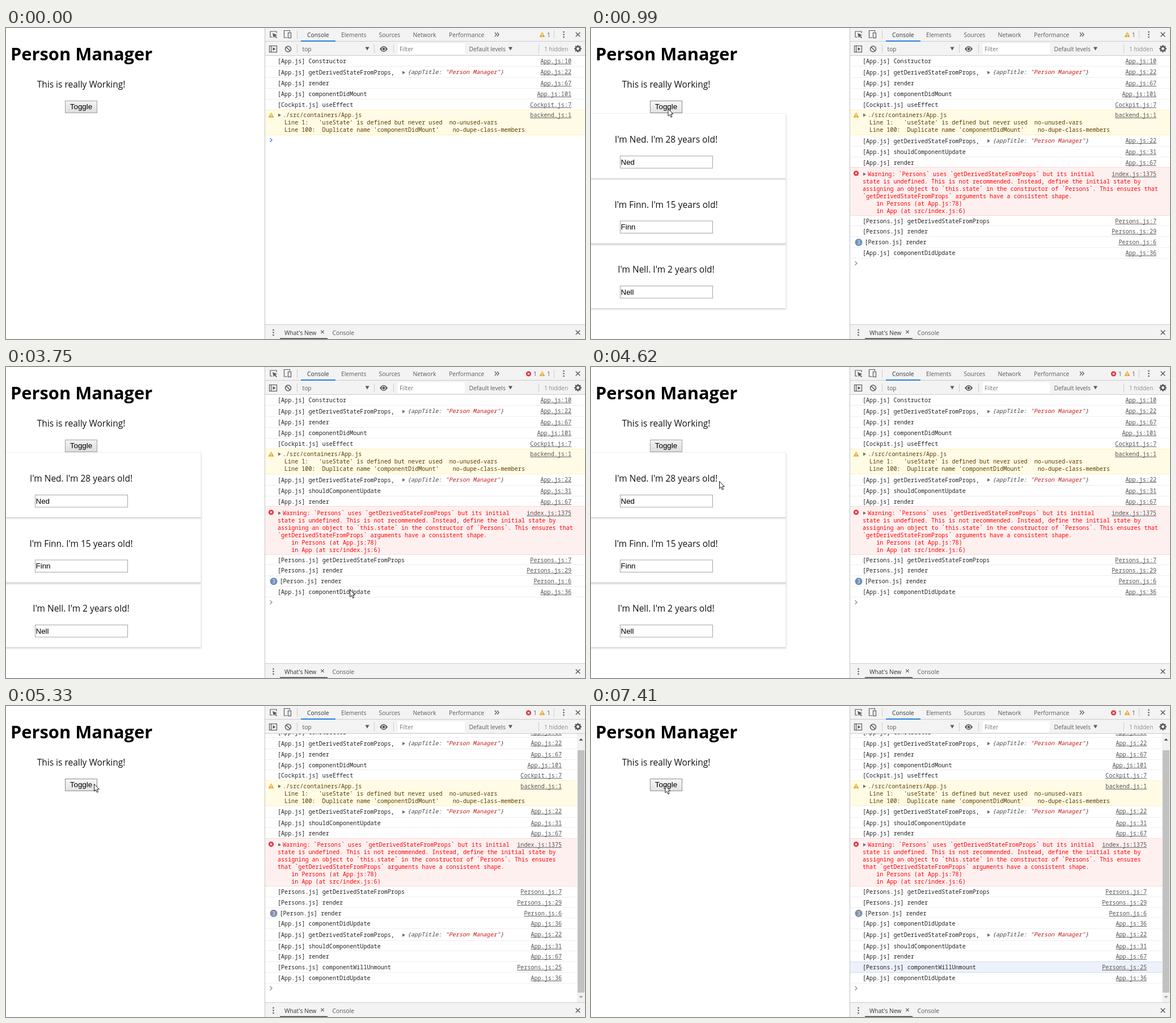
Animation of 1021 by 548 pixels, one loop 8000 ms. Source, as an HTML page with a canvas:

```html
<!DOCTYPE html>
<html lang="en">
<head>
<meta charset="utf-8">
<title>Person Manager</title>
<style>
html, body { margin: 0; width: 1021px; height: 548px; overflow: hidden; background: #fff; }
canvas { display: block; }
</style>
</head>
<body>
<canvas id="stage" width="1021" height="548"></canvas>
<script>
const ctx = document.getElementById('stage').getContext('2d');
const LOOP = 8000;
const MONO = '10.1px "Noto Sans Mono", monospace';
const UI = '10.3px "Open Sans", sans-serif';
const BODY = '15.5px "Open Sans", sans-serif';
const FORM = '13.4px "Liberation Sans", Arial, sans-serif';
const CHAR = 6.06, ROW = 18.75, LINE = 12.9, TOP = 49.3;
const CARD_TOP = 150.5, CARD = 114.5;
const PROPS = '[App.js] getDerivedStateFromProps,';

const people = [['Ned', 28], ['Finn', 15], ['Nell', 2]];
const logs = [
  ['[App.js] Constructor', 'App.js:10'],
  [PROPS, 'App.js:22', 'object'],
  ['[App.js] render', 'App.js:67'],
  ['[App.js] componentDidMount', 'App.js:101'],
  ['[Cockpit.js] useEffect', 'Cockpit.js:7'],
  ['', 'backend.js:1', 'warn'],
  [PROPS, 'App.js:22', 'object'],
  ['[App.js] shouldComponentUpdate', 'App.js:31'],
  ['[App.js] render', 'App.js:67'],
  ['', 'index.js:1375', 'error'],
  ['[Persons.js] getDerivedStateFromProps', 'Persons.js:7'],
  ['[Persons.js] render', 'Persons.js:29'],
  ['[Person.js] render', 'Person.js:6', 'count'],
  ['[App.js] componentDidUpdate', 'App.js:36'],
  [PROPS, 'App.js:22', 'object'],
  ['[App.js] shouldComponentUpdate', 'App.js:31'],
  ['[App.js] render', 'App.js:67'],
  ['[Persons.js] componentWillUnmount', 'Persons.js:25', 'hover'],
  ['[App.js] componentDidUpdate', 'App.js:36']
];
const heights = { object: 20.3, warn: 44, error: 84.2 };
const baselines = { warn: 12.5, error: 14.4 };
const tints = {
  warn: ['#fffbe5', '#fff3c0'],
  error: ['#fff0f0', '#ffd6d6'],
  hover: ['#ecf1fa', '#d3dff3']
};
const warnLines = [
  './src/containers/App.js',
  "Line 1:   'useState' is defined but never used  no-unused-vars",
  "Line 100:  Duplicate name 'componentDidMount'    no-dupe-class-members"
];
const errorLines = narrow => [
  'Warning: `Persons` uses `getDerivedStateFromProps` but its initial',
  'state is undefined. This is not recommended. Instead, define the initial state by',
  'assigning an object to `this.state` in the constructor of `Persons`. This ensures' + (narrow ? '' : ' that'),
  (narrow ? 'that ' : '') + '`getDerivedStateFromProps` arguments have a consistent shape.',
  '    in Persons (at App.js:78)',
  '    in App (at src/index.js:6)'
];

// Pointer moves: first step, last step, number of steps, end x, end y
const moves = [
  [70, 830, 11, 135.5, 142], [1250, 1500, 4, 135.5, 126],
  [1810, 1810, 1, 135.5, 114], [1880, 1880, 1, 135.5, 126],
  [2350, 2430, 2, 136, 134], [2810, 3450, 9, 606, 399],
  [3750, 3750, 1, 606, 392], [3820, 4540, 10, 233, 204],
  [4620, 4620, 1, 226, 201], [4700, 4860, 3, 156, 134],
  [5090, 5090, 1, 156, 125], [5240, 5240, 1, 155, 137],
  [5500, 5870, 6, 635, 439], [6100, 6320, 4, 634, 460],
  [6490, 6490, 1, 634, 457], [6640, 6640, 1, 620, 457],
  [6790, 7410, 9, 130.5, 140]
];

function pointerAt(t) {
  let x = 905, y = 549;
  for (const [start, end, steps, toX, toY] of moves) {
    if (t < start) break;
    const step = t >= end ? steps : 1 + Math.floor((t - start) / (end - start) * (steps - 1));
    const p = step / steps, ease = p * p * (3 - 2 * p);
    x += (toX - x) * ease;
    y += (toY - y) * ease;
  }
  return [x, y];
}

function rect(x, y, w, h, color) {
  ctx.fillStyle = color;
  ctx.fillRect(x, y, w, h);
}
function text(str, x, y, font, color = '#222', align = 'left') {
  ctx.font = font;
  ctx.fillStyle = color;
  ctx.textAlign = align;
  ctx.fillText(str, x, Math.round(y));
}
function poly(points, fill, stroke, width = 1, close = !!fill) {
  ctx.beginPath();
  points.forEach(([x, y]) => ctx.lineTo(x, y));
  if (close) ctx.closePath();
  if (fill) { ctx.fillStyle = fill; ctx.fill(); }
  if (stroke) { ctx.strokeStyle = stroke; ctx.lineWidth = width; ctx.stroke(); }
}
function circle(x, y, r, fill, stroke, width = 1) {
  ctx.beginPath();
  ctx.arc(x, y, r, 0, Math.PI * 2);
  if (fill) { ctx.fillStyle = fill; ctx.fill(); }
  if (stroke) { ctx.strokeStyle = stroke; ctx.lineWidth = width; ctx.stroke(); }
}
function frame(x, y, w, h, color, width = 1) {
  ctx.strokeStyle = color;
  ctx.lineWidth = width;
  ctx.strokeRect(x, y, w, h);
}
function cross(x, y, r, color, width) {
  poly([[x - r, y - r], [x + r, y + r]], null, color, width);
  poly([[x + r, y - r], [x - r, y + r]], null, color, width);
}
function dots(x, y) {
  for (const dy of [-4.5, 0, 4.5]) circle(x, y + dy, 1.3, '#5a5a5a');
}
const down = (x, y) => poly([[x - 3.5, y - 3], [x + 3.5, y - 3], [x, y + 3]], '#5a5a5a');
const expander = (x, y) => poly([[x - 2, y - 3], [x + 3, y], [x - 2, y + 3]], '#6e6e6e');
const divider = (x, y) => rect(x, y, 1, 15, '#ccc');

function warnIcon(x, y) {
  poly([[x, y - 4.5], [x + 5, y + 4.5], [x - 5, y + 4.5]], '#eaab2e');
  rect(x - .6, y - 1.5, 1.2, 3.2, '#fff');
  rect(x - .6, y + 2.4, 1.2, 1.2, '#fff');
}
function errorIcon(x, y) {
  circle(x, y, 4.6, '#e0333c');
  cross(x, y, 1.7, '#fff', 1.2);
}

function drawButton(hover) {
  const shade = ctx.createLinearGradient(0, 128, 0, 150);
  shade.addColorStop(0, hover ? '#f8f8f8' : '#f4f4f4');
  shade.addColorStop(1, hover ? '#e2e2e2' : '#dcdcdc');
  rect(104, 128, 57, 22, shade);
  frame(104.5, 128.5, 56, 21, hover ? '#8c8c8c' : '#a2a2a2');
  text('Toggle', 132.5, 143, FORM, '#000', 'center');
}

function drawPage(showPeople, hover) {
  text('Person Manager', 8, 57, 'bold 30.8px "Open Sans", sans-serif', '#000');
  text('This is really Working!', 132.5, 105, BODY, '#111', 'center');
  if (showPeople) {
    for (let i = 2; i >= 0; i--) {
      const y = CARD_TOP + i * CARD;
      ctx.save();
      ctx.shadowColor = '#ccc';
      ctx.shadowOffsetY = 2;
      ctx.shadowBlur = 3;
      rect(-9, y, 352.5, CARD, '#fff');
      ctx.restore();
      frame(-9, y, 352.5, CARD - .5, '#ededed');
    }
    people.forEach(([name, age], i) => {
      const y = CARD_TOP + i * CARD;
      text(`I'm ${name}. I'm ${age} years old!`, 132.5, y + 51.7, BODY, '#111', 'center');
      frame(51.5, y + 75, 163, 21.5, '#a6a6a6');
      text(name, 52.5, y + 90.4, FORM, '#000');
    });
  }
  drawButton(hover);
}

function drawBlock(lines, y, indent, color) {
  lines.forEach((line, i) => text(line, 479 + (i ? indent : 9), y + i * LINE, MONO, color));
  expander(482, y - 3.5);
}

function drawConsole(t) {
  const scrolled = t >= 5330;
  const count = t < 990 ? 6 : scrolled ? 19 : 14;
  const right = scrolled ? 1007 : 1021;
  const linkEnd = scrolled ? 980 : 997;
  let y = TOP - (scrolled ? 12.4 : 0);
  ctx.save();
  ctx.beginPath();
  ctx.rect(457, 49, 564, 474);
  ctx.clip();
  for (const [label, link, kind] of logs.slice(0, count)) {
    const h = heights[kind] || ROW;
    const base = Math.round(y + (baselines[kind] || 13));
    const top = Math.round(y), bottom = Math.round(y + h);
    const tint = kind === 'hover' && t < 6490 ? null : tints[kind];
    if (tint) {
      rect(457, top - 1, right - 457, bottom - top + 1, tint[1]);
      rect(457, top, right - 457, bottom - top - 1, tint[0]);
    } else {
      rect(457, bottom - 1, right - 457, 1, '#efefef');
    }
    if (kind === 'warn') {
      warnIcon(467.5, y + 8.6);
      drawBlock(warnLines, base, 12, '#5c3c00');
    } else if (kind === 'error') {
      errorIcon(467.5, y + 9.6);
      drawBlock(errorLines(scrolled), base, 0, '#f00');
    } else if (kind === 'count') {
      circle(472, y + 9.6, 6.5, scrolled ? '#7f8fa8' : '#6f8fbd');
      text('3', 472, y + 13, '9px "Open Sans", sans-serif', '#fff', 'center');
    } else if (kind === 'object') {
      const italic = 'italic ' + MONO;
      expander(701, y + 10.5);
      text('{appTitle: ', 708, base, italic, '#444');
      text('"Person Manager"', 708 + 11 * CHAR, base, italic, '#c41a16');
      text('}', 708 + 27 * CHAR, base, italic, '#444');
    }
    text(label, kind === 'count' ? 482.5 : 479, base + (kind === 'object' ? 1.4 : 0), MONO);
    text(link, linkEnd, base, MONO, '#545454', 'right');
    rect(linkEnd - link.length * CHAR, base + 1, link.length * CHAR, 1, '#666');
    y += h;
  }
  poly([[465.5, y + 5.6], [469, y + 9], [465.5, y + 12.4]], null, t < 990 ? '#3b82d8' : '#8492b4', 1.4);
  if (scrolled) {
    rect(1007, 49, 14, 474, '#f1f1f1');
    rect(1008, 78, 12, 427, '#c1c1c1');
    poly([[1010.5, 61], [1017.5, 61], [1014, 57]], '#505050');
    poly([[1010.5, 511], [1017.5, 511], [1014, 515]], '#a3a3a3');
  }
  ctx.restore();
}

function drawTools(t) {
  const gray = '#5a5a5a';
  rect(457, 0, 564, 49, '#f3f3f3');
  rect(457, 23, 564, 1, '#ccc');
  rect(457, 48, 564, 1, '#ccc');
  rect(457, 523, 564, 25, '#f3f3f3');
  rect(457, 522, 564, 1, '#ccc');
  rect(456, 0, 1, 548, '#c4c4c4');

  // Tab bar
  poly([[470, 16], [466, 16], [466, 6], [477, 6], [477, 9]], null, gray, 1.2);
  poly([[470, 9], [478.5, 12.5], [475, 13.5], [478, 17], [476.5, 18], [473.8, 14.8], [472, 17.5]], gray);
  poly([[496, 17], [490.5, 17], [490.5, 4.5], [500.5, 4.5], [500.5, 7]], null, gray, 1.2);
  frame(497.5, 8.5, 5, 9, gray, 1.2);
  divider(513, 4);
  [['Console', 531], ['Elements', 591], ['Sources', 657.5], ['Network', 717.5], ['Performance', 781]]
    .forEach(([name, x], i) => text(name, x, 16, UI, i ? gray : '#333'));
  rect(520, 22, 61, 2, '#2b7de0');
  for (const x of [862, 866]) poly([[x, 8], [x + 3.2, 11.5], [x, 15]], null, gray, 1.3);
  if (t >= 1070) {
    errorIcon(921.5, 12);
    text('1', 930, 16, UI, gray);
  }
  warnIcon(945.5, 11.5);
  text('1', 954, 16, UI, gray);
  divider(966, 4);
  dots(983.5, 11.5);
  cross(1008.5, 11.5, 3.8, gray, 1.5);

  // Filter bar
  frame(464.5, 31.5, 13, 11, gray, 1.2);
  rect(467, 31, 1.2, 12, gray);
  poly([[470.5, 34], [475.5, 37], [470.5, 40]], gray);
  circle(497.5, 37, 5, null, gray, 1.5);
  poly([[494, 33.5], [501, 40.5]], null, gray, 1.5);
  divider(513, 29);
  text('top', 522.5, 41, UI, gray);
  down(637, 36.5);
  divider(649, 29);
  ctx.beginPath();
  ctx.moveTo(659, 37);
  ctx.quadraticCurveTo(666, 27, 673, 37);
  ctx.quadraticCurveTo(666, 47, 659, 37);
  ctx.fillStyle = gray;
  ctx.fill();
  circle(666, 37, 3, null, '#f3f3f3', 1.2);
  divider(683, 29);
  rect(691, 27, 118, 19, '#fff');
  text('Filter', 694, 41, UI, '#757575');
  text('Default levels', 816.5, 41, UI, gray);
  down(889.5, 36.5);
  divider(939, 29);
  text('1 hidden', 949, 41, UI, '#8c8c8c');
  circle(1008.5, 36.5, 3.7, null, gray, 2.6);
  for (let i = 0; i < 8; i++) {
    const a = i * Math.PI / 4, c = Math.cos(a), s = Math.sin(a);
    poly([[1008.5 + 4 * c, 36.5 + 4 * s], [1008.5 + 6.4 * c, 36.5 + 6.4 * s]], null, gray, 2.4);
  }

  // Drawer
  dots(471.5, 536.5);
  text("What's New", 491, 541, UI, '#333');
  cross(558, 535.5, 2.7, gray, 1.2);
  rect(483, 546.5, 84, 1.5, '#444');
  text('Console', 575.5, 541, UI, gray);
  cross(1008.5, 536.5, 3.8, gray, 1.5);
}

function drawPointer(x, y) {
  const shape = [[0, 0], [0, 12.6], [2.9, 10], [4.9, 14.7], [7, 13.8], [5, 9.2], [8.9, 9.2]];
  poly(shape.map(([dx, dy]) => [x + .5 + dx, y + .5 + dy]), '#fff', '#1a1a2a', 1);
}

function draw(now) {
  const t = now % LOOP;
  const [x, y] = pointerAt(t);
  const hover = x >= 104 && x <= 161 && y >= 128 && y <= 150;
  rect(0, 0, 1021, 548, '#fff');
  drawPage(t >= 920 && t < 5240, hover);
  drawConsole(t);
  drawTools(t);
  drawPointer(x, y);
}

const began = performance.now();
function tick() {
  draw(performance.now() - began);
  requestAnimationFrame(tick);
}
tick();
</script>
</body>
</html>
```
